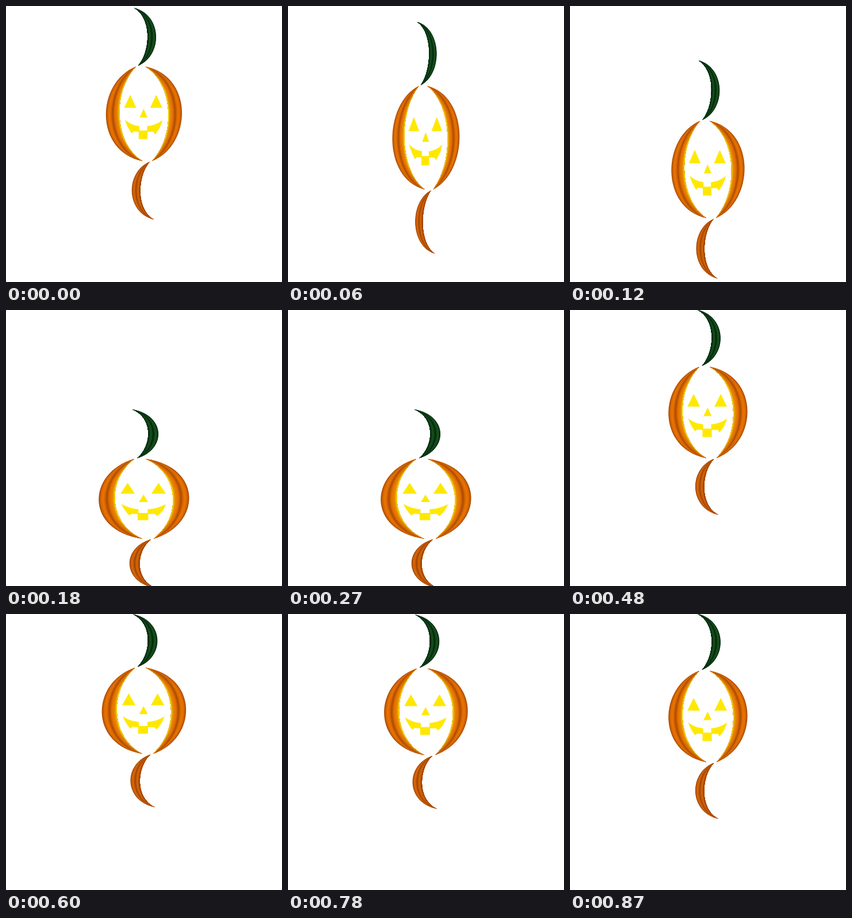
Recreate the animation shown at these times as an HTML page with a canvas. Size 480 by 480 pixels, loop 900 ms.

```html
<!DOCTYPE html>
<html lang="en">
<head>
<meta charset="utf-8">
<title>Bouncing pumpkin</title>
<style>
  html, body { margin: 0; width: 100%; height: 100%; overflow: hidden; background: #fff; }
  canvas { display: block; width: 480px; height: 480px; }
</style>
</head>
<body>
<canvas id="stage" width="480" height="480"></canvas>
<script>
const ctx = document.getElementById('stage').getContext('2d');
const STEP = 30, COUNT = 30, APEX = 22.5, BASE = 148.5;

// Each edge is one cubic from tip to tip.
const SIDE = {
  outer: [-16, -74.5, -93, -49, -96.7, 59, -3, 74.5],
  inner: [-16, -74.5, -63, -33, -56, 49, -3, 74.5]
};
const STEM = {
  outer: [-19, -167, 36, -156, 36.7, -92, -11, -76],
  inner: [-19, -167, 16, -151, 12.7, -98, -11, -76]
};

// Groove, ridge and inner-edge colours.
const ORANGE = { dark: [168, 74, 2], light: [232, 114, 2], rim: [255, 224, 0] };
const RUST = { dark: [154, 66, 4], light: [214, 102, 8], rim: [154, 66, 4] };
const GREEN = { dark: [0, 34, 16], light: [24, 80, 26], rim: [0, 46, 20] };

const clamp = x => Math.min(1, Math.max(0, x));
const mix = (a, b, f) => a + (b - a) * f;
const blend = (a, b, f) => a.map((v, i) => mix(v, b[i], f));
const ease = (u, from, to) => (1 - Math.cos(Math.PI * clamp((u - from) / (to - from)))) / 2;

// u counts steps away from the apex: a slow hover, then a stretched drop into a squash.
const centre = u => 166.4 + .29 * Math.min(u, 6) ** 2 + 165 * ease(u, 6, 15.2);
const height = u => BASE + 33.5 * clamp(u / 9.8) ** 3 - 52 * ease(u, 9.8, 14.8);

function shade({ dark, light, rim }, f) {
  const ridge = blend(dark, light, Math.abs(Math.sin(2 * Math.PI * f)));
  return blend(ridge, rim, clamp((f - .6) / .4) ** 3).map(Math.round);
}

function lens(a, b) {
  ctx.beginPath();
  ctx.moveTo(a[0], a[1]);
  ctx.bezierCurveTo(...a.slice(2));
  ctx.bezierCurveTo(b[4], b[5], b[2], b[3], b[0], b[1]);
  ctx.closePath();
}

function rib({ outer, inner }, tones) {
  const layers = 32;
  for (let i = 0; i < layers; i++) {
    lens(blend(outer, inner, i / layers), inner);
    ctx.fillStyle = `rgb(${shade(tones, i / (layers - 1))})`;
    ctx.fill();
  }
  // Darken both tips.
  const fade = ctx.createLinearGradient(0, outer[1], 0, outer[7]);
  for (const [at, alpha] of [[0, .45], [.25, 0], [.75, 0], [1, .45]]) {
    fade.addColorStop(at, `rgba(${tones.dark},${alpha})`);
  }
  lens(outer, inner);
  ctx.fillStyle = fade;
  ctx.fill();
}

function triangle(x, y, w, h) {
  ctx.moveTo(x, y);
  ctx.lineTo(x - w / 2, y + h);
  ctx.lineTo(x + w / 2, y + h);
  ctx.closePath();
}

function face() {
  const line = (...points) => points.forEach(p => ctx.lineTo(...p));
  ctx.fillStyle = '#ffe800';
  ctx.beginPath();
  triangle(-26.6, -30, 23.5, 20.5);
  triangle(23.7, -30, 23.5, 20.5);
  triangle(-.8, -8, 15, 14);
  ctx.moveTo(-37, 9.7);
  ctx.quadraticCurveTo(-24, 18.5, -9, 19.5);
  line([-9, 26.5], [6, 26.5], [6, 19.5]);
  ctx.quadraticCurveTo(22, 18.5, 35.7, 10);
  ctx.quadraticCurveTo(32, 23, 21.5, 32.5);
  line([18, 28.5], [7, 28.5], [7, 40], [-10.3, 40], [-10.3, 28.5], [-20, 28], [-24, 31]);
  ctx.quadraticCurveTo(-32, 22, -37, 9.7);
  ctx.fill();
}

function draw(now) {
  const tick = Math.floor(now / STEP) % COUNT;
  const gap = Math.abs(tick - APEX);
  const u = Math.min(gap, COUNT - gap);
  const sy = height(u) / BASE;

  ctx.setTransform(1, 0, 0, 1, 0, 0);
  ctx.fillStyle = '#fff';
  ctx.fillRect(0, 0, 480, 480);
  ctx.translate(240, centre(u));
  ctx.scale(2 - sy, sy);

  rib(STEM, GREEN);
  rib(SIDE, ORANGE);
  face();
  ctx.scale(-1, -1);
  rib(SIDE, ORANGE);
  rib(STEM, RUST);
}

function loop() {
  draw(performance.now());
  requestAnimationFrame(loop);
}
loop();
</script>
</body>
</html>
```
